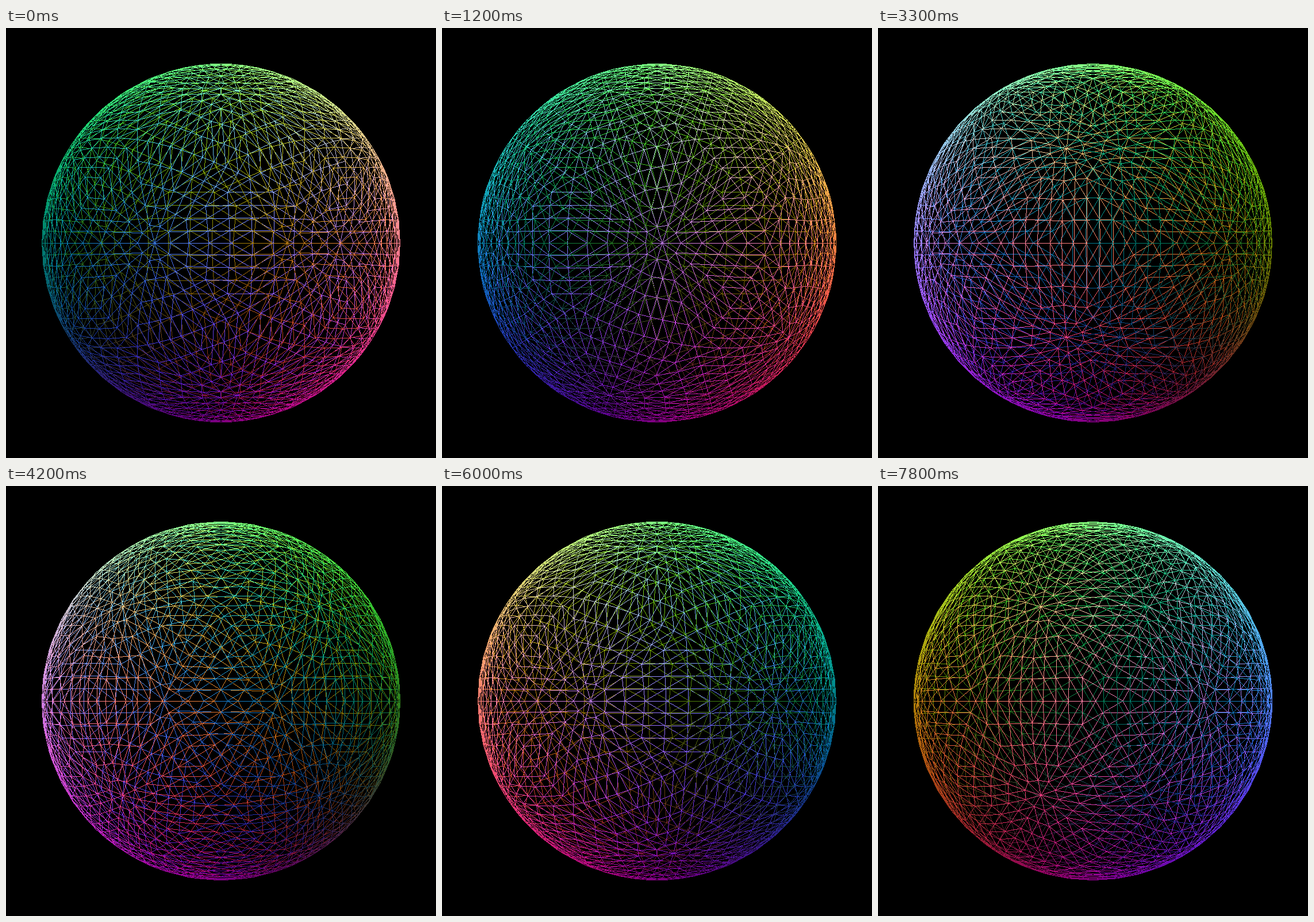
An HTML page with a canvas that plays this animation: 748 px wide and 748 px high, repeating every 8000 ms.

```html
<!DOCTYPE html>
<html lang="en">
<head>
<meta charset="utf-8">
<title>Rotating wireframe sphere</title>
<style>
html, body { margin: 0; width: 100%; height: 100%; overflow: hidden; background: #000; }
canvas { display: block; }
</style>
</head>
<body>
<canvas id="view" width="748" height="748"></canvas>
<script>
const SIZE = 748, MID = SIZE / 2, RADIUS = SIZE / 2.4;
const LOOP = 8000, STEP = 300;
const SPLIT = 5;

const ctx = document.getElementById('view').getContext('2d');
const image = ctx.createImageData(SIZE, SIZE);
const pixels = new Uint32Array(image.data.buffer);

const mix = (pts, w) => [0, 1, 2].map(i => pts.reduce((s, p, n) => s + p[i] * w[n], 0));
const unit = p => { const l = Math.hypot(...p); return p.map(v => v / l); };
const dot = (a, b) => a[0] * b[0] + a[1] * b[1] + a[2] * b[2];

function icosahedron() {
  const g = (1 + Math.sqrt(5)) / 2, out = [];
  for (const s of [-1, 1]) for (const t of [-g, g]) {
    out.push([s, 0, t], [0, t, s], [t, s, 0]);
  }
  return out.map(unit);
}

// Each face is cut into six by its medians, each part into SPLIT² triangles,
// and the points are pushed out onto the sphere.
function buildMesh() {
  const corners = icosahedron(), verts = [], ids = new Map(), edges = new Map();
  const near = (a, b) => dot(a, b) > 0.4;

  const vertex = p => {
    const u = unit(p), key = u.map(v => Math.round(v * 1e5) + 0).join();
    if (!ids.has(key)) { ids.set(key, verts.length); verts.push(u); }
    return ids.get(key);
  };
  const edge = (a, b) => edges.set(Math.min(a, b) + '-' + Math.max(a, b), [a, b]);

  function split(tri) {
    const at = (i, j) => vertex(mix(tri, [i / SPLIT, j / SPLIT, (SPLIT - i - j) / SPLIT]));
    for (let i = 0; i < SPLIT; i++) {
      for (let j = 0; i + j < SPLIT; j++) {
        const a = at(i, j), b = at(i + 1, j), c = at(i, j + 1);
        edge(a, b); edge(b, c); edge(c, a);
      }
    }
  }

  corners.forEach((a, i) => corners.forEach((b, j) => corners.forEach((c, k) => {
    if (i === j || j === k || i === k || !near(a, b) || !near(b, c) || !near(a, c)) return;
    split([a, mix([a, b], [0.5, 0.5]), mix([a, b, c], [1 / 3, 1 / 3, 1 / 3])]);
  })));

  const order = ([a, b]) => {
    const z = verts[a][2] + verts[b][2];
    return Math.abs(z) - 0.01 * z;
  };
  return { verts, edges: [...edges.values()].sort((p, q) => order(q) - order(p)) };
}

const mesh = buildMesh();
const colors = mesh.verts.map(p => p.map(v => 127.5 + 127.5 * v));

// One-pixel hard-edged line with a colour blend along it.
function line(p, q, cp, cq) {
  const dx = q[0] - p[0], dy = q[1] - p[1];
  const major = Math.abs(dx) >= Math.abs(dy) ? 0 : 1, minor = 1 - major;
  if (p[major] > q[major]) { [p, q] = [q, p]; [cp, cq] = [cq, cp]; }
  const len = q[major] - p[major];
  if (len < 1e-6) return;
  const end = q[major] - 0.5;
  for (let m = Math.ceil(p[major] - 0.5); m <= end; m++) {
    const f = (m + 0.5 - p[major]) / len;
    const n = Math.floor(p[minor] + (q[minor] - p[minor]) * f);
    const r = cp[0] + (cq[0] - cp[0]) * f;
    const g = cp[1] + (cq[1] - cp[1]) * f;
    const b = cp[2] + (cq[2] - cp[2]) * f;
    pixels[major ? m * SIZE + n : n * SIZE + m] = 0xff000000 | b << 16 | g << 8 | r;
  }
}

function draw(step) {
  const turn = (10 - 10 * step) * Math.PI / 180;
  const c = Math.cos(turn), s = Math.sin(turn);
  const flat = mesh.verts.map(([x, y, z]) => [MID + RADIUS * (x * c + z * s), MID - RADIUS * y]);
  pixels.fill(0xff000000);
  for (const [a, b] of mesh.edges) line(flat[a], flat[b], colors[a], colors[b]);
  ctx.putImageData(image, 0, 0);
}

const start = performance.now();
let shown = -1;
function tick() {
  const step = Math.floor((performance.now() - start) % LOOP / STEP);
  if (step !== shown) draw(shown = step);
  requestAnimationFrame(tick);
}
tick();
</script>
</body>
</html>
```
